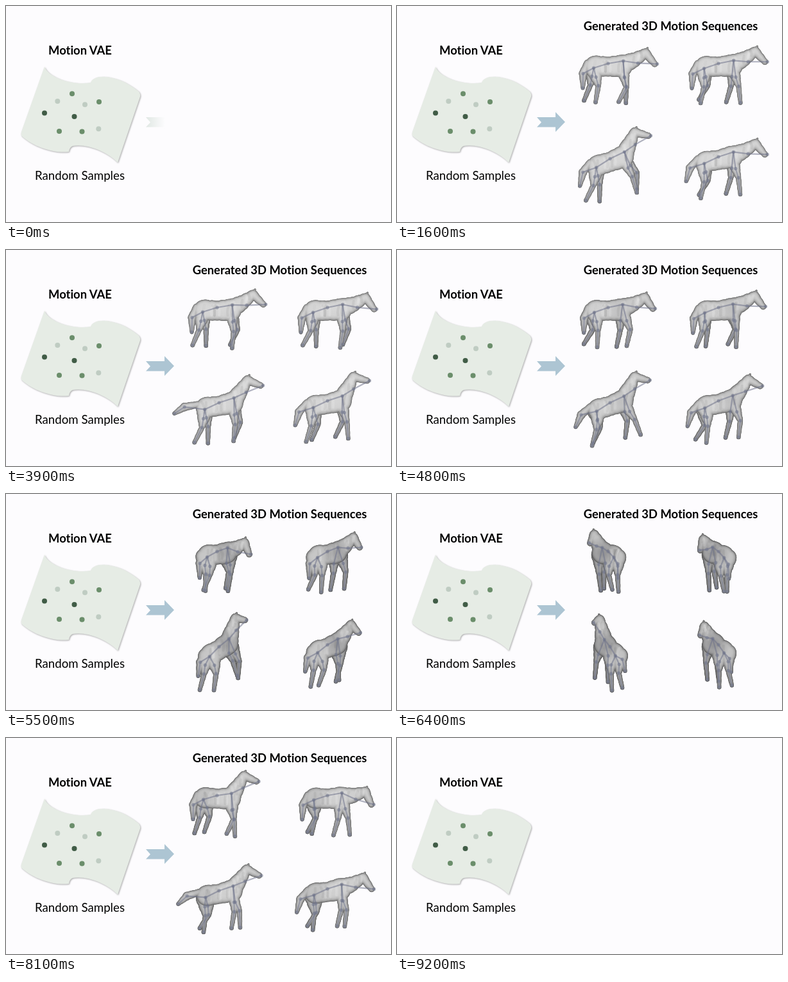
Animation of 600 by 338 pixels, one loop 9.9 s. Source, as an HTML page with a canvas:

```html
<!DOCTYPE html>
<html lang="en">
<head>
<meta charset="utf-8">
<title>Motion VAE</title>
<style>
html, body { margin: 0; width: 100%; height: 100%; overflow: hidden; background: #fdfcfe; }
svg, canvas { position: absolute; left: 0; top: 0; width: 600px; height: 338px; }
text { font: 18.7px Lato, sans-serif; font-variant-ligatures: none; text-anchor: middle; fill: #000; }
.bold { font-size: 18.4px; font-weight: 700; }
.sheet { fill: #e6ece5; filter: drop-shadow(1px 1.5px 1px #6668); }
</style>
</head>
<body>
<svg viewBox="0 0 600 338">
  <defs>
    <linearGradient id="wipe" gradientUnits="userSpaceOnUse" y1="0" y2="0">
      <stop offset="0" stop-color="#adc5d3"/>
      <stop offset="1" stop-color="#adc5d3" stop-opacity="0"/>
    </linearGradient>
  </defs>
  <text class="bold" x="115.5" y="76">Motion VAE</text>
  <path class="sheet" d="M60 95C66 112 104 125 132 120C136 105 176 107 207 134Q210 138 209 142L174 245C158 228 126 215 104 219Q99 221 98 228C78 231 44 222 24 203Q23 200 24 197Z"/>
  <g fill="#6b8e6b">
    <circle cx="103" cy="137.3" r="4"/><circle cx="145" cy="150" r="4"/>
    <circle cx="83" cy="196" r="4"/><circle cx="118.5" cy="196.5" r="4"/>
  </g>
  <g fill="#bfccc2">
    <circle cx="80.3" cy="149" r="4"/><circle cx="123" cy="154.3" r="4"/><circle cx="144.3" cy="192.3" r="4"/>
  </g>
  <g fill="#405c46">
    <circle cx="60" cy="167.6" r="4"/><circle cx="106.5" cy="173" r="4"/>
  </g>
  <text x="115" y="272">Random Samples</text>
  <path id="arrow" fill="url(#wipe)" d="M218 174H247V166L262 181.5L247 197V189.5H218L225 182Z"/>
  <text id="title" class="bold" x="426.5" y="38">Generated 3D Motion Sequences</text>
</svg>
<canvas id="herd" width="600" height="338"></canvas>
<script>
const $ = id => document.getElementById(id);
const ctx = $('herd').getContext('2d');
const { PI, sin, cos, max, min, round, abs, hypot } = Math;
const LOOP = 9900, STEP = 100, DEG = PI / 180;

// neck: degrees above level at each beat; prance: rearing and tail-raising
const beats = [1600, 2800, 3900, 5500, 7400];
const herd = [
  { x: 329, y: 94, period: 1467, zero: 3900, pitch: 0, droop: 80, prance: 0, neck: [28, 31, 34, 18, 57] },
  { x: 501, y: 94, period: 1000, zero: 1850, pitch: 2, droop: 77, prance: 0, neck: [31, 23, 25, 29, 15] },
  { x: 332, y: 243, period: 1150, zero: 1565, pitch: 14, droop: 42, prance: 1, neck: [64, 50, 56, 66, 54] },
  { x: 501, y: 240, period: 1100, zero: 775, pitch: 10, droop: 63, prance: 0, neck: [29, 49, 62, 40, 27] }
];

const clamp = (v, a = 0, b = 1) => min(b, max(a, v));
const mix = (a, b, u) => a + (b - a) * u;
const lerp = (p, q, u) => p.map((v, i) => mix(v, q[i], u));
const add = (p, x, y, z = 0) => [p[0] + x, p[1] + y, p[2] + z];
const reach = (p, length, angle) => add(p, length * cos(angle), length * sin(angle));

function track(values, t) {
  let k = 0;
  while (k < beats.length - 2 && t > beats[k + 1]) k++;
  const u = clamp((t - beats[k]) / (beats[k + 1] - beats[k]));
  return mix(values[k], values[k + 1], u * u * (3 - 2 * u));
}

// One full turn that gathers speed
const yawAt = t => 2 * PI * clamp((t - 3500) / 4700) ** 2.4;

// Skeleton in horse space: forward, up, side
function skeleton(h, t) {
  const wave = h.prance * cos(2 * PI * (t - 1600) / 3900);
  const pitch = (h.pitch + 5 * wave) * DEG;
  const neck = track(h.neck, t) * DEG;
  const chest = reach([0, 0, 0], 20.5, pitch), rump = reach([0, 0, 0], -20.5, pitch);
  const poll = reach(chest, 43, neck);
  const muzzle = reach(poll, 22, neck - 78 * DEG);
  const dock = add(rump, -12, 5);
  const tip = reach(dock, 40, PI + (h.droop + 25 * wave) * DEG);
  const legs = [0, 1, 2, 3].map(i => {
    const front = i > 1, side = i % 2 ? 1 : -1;
    const phase = 2 * PI * (t - h.zero) / h.period + (side > 0 ? PI : 0) + (front ? 0 : PI / 2);
    const bias = front ? .03 + .2 * (h.prance + wave) : -.08;
    const angle = bias + .2 * sin(phase) - PI / 2;
    const flex = .12 + .35 * max(0, cos(phase));
    const root = add(front ? chest : rump, front ? 2 : -2, -3, side * 7);
    const knee = reach(root, front ? 30 : 28, angle + flex * .6);
    return { front, root, knee, hoof: reach(knee, 26, angle - flex) };
  });
  return { chest, rump, poll, muzzle, dock, tip, legs };
}

// Chain of points with radii -> overlapping discs
function tube(pts, radii) {
  const discs = [];
  for (let i = 0; i < pts.length - 1; i++) {
    const p = pts[i], q = pts[i + 1];
    const n = max(1, Math.ceil(hypot(q[0] - p[0], q[1] - p[1]) / 1.5));
    for (let j = 0; j <= n; j++) {
      const wobble = 1 + .035 * sin(j * .9 + i * 2);
      const [x, y] = lerp(p, q, j / n);
      discs.push([x, y, mix(radii[i], radii[i + 1], j / n) * wobble]);
    }
  }
  return discs;
}

// Inset layers, from the dark rim to the light middle
function relief(discs, tone) {
  for (let k = 0; k < 12; k++) {
    const d = k * k * .1;
    const v = round(106 + tone + 108 * (1 - Math.exp(-d / 1.8)));
    ctx.fillStyle = `rgb(${v},${v},${v})`;
    ctx.beginPath();
    for (const [x, y, r] of discs) {
      if (r <= d) continue;
      ctx.moveTo(x + r - d, y - d * .2);
      ctx.arc(x, y - d * .2, r - d, 0, 7);
    }
    ctx.fill();
  }
}

function creases(discs) {
  ctx.lineWidth = 4;
  for (let i = 0; i < 14; i++) {
    const [x, y, r] = discs[i * 37 % discs.length];
    const w = r * .5, s = sin(i * 5.3);
    ctx.strokeStyle = i % 2 ? '#ffffff28' : '#60606018';
    ctx.beginPath();
    ctx.moveTo(x + s * w, y - w);
    ctx.quadraticCurveTo(x + s * w * .3, y, x + s * w * .6, y + w);
    ctx.stroke();
  }
}

// Darker patch over the end that faces away
function shade([x, y], alpha) {
  const glow = ctx.createRadialGradient(x, y, 4, x, y, 26);
  glow.addColorStop(0, `rgba(70,70,74,${alpha})`);
  glow.addColorStop(1, 'rgba(70,70,74,0)');
  ctx.globalCompositeOperation = 'source-atop';
  ctx.fillStyle = glow;
  ctx.fillRect(x - 26, y - 26, 52, 52);
  ctx.globalCompositeOperation = 'source-over';
}

function bones(pts, firstDot = 0) {
  ctx.beginPath();
  pts.forEach(([x, y]) => ctx.lineTo(x, y));
  ctx.stroke();
  for (const [x, y] of pts.slice(firstDot)) {
    ctx.beginPath();
    ctx.arc(x, y, 2.7, 0, 7);
    ctx.fill();
  }
}

function drawHorse(h, t) {
  const yaw = yawAt(t), c = cos(yaw), s = sin(yaw);
  const project = ([f, u, side]) => {
    const depth = side * c - f * s;
    return [h.x + f * c + side * s, h.y - u + depth * .1, depth];
  };
  const body = skeleton(h, t);
  const { chest, rump, poll, muzzle, dock, tip, legs } = body;
  const chain = (pts, radii) => tube(pts.map(project), radii);

  const tailMid = add(lerp(dock, tip, .5), -3, 3);
  const trunk = [
    ...chain([rump, add(lerp(rump, chest, .5), 0, -1), chest], [16, 15, 17]),
    ...chain([add(chest, 2, 2), add(lerp(chest, poll, .5), 0, -1), poll], [15, 11.5, 7.5])
  ];
  const head = [
    ...chain([poll, muzzle], [7.5, 4.8]),
    ...chain([add(poll, 1, 4), add(poll, 3, 8)], [3, 1.5])
  ];
  const tail = chain([dock, tailMid, tip], [5, 6.5, 3]);
  const limb = ({ front, root, knee, hoof }) =>
    chain([root, lerp(root, knee, .55), knee, hoof], front ? [11, 7, 4.2, 3.2] : [13, 8.5, 4.2, 3.2]);

  const sorted = [...legs].sort((a, b) => project(a.root)[2] - project(b.root)[2]);
  const tone = -20 * abs(s);
  relief(sorted.slice(0, 2).flatMap(limb), tone - 12);
  relief([...tail, ...sorted.slice(2).flatMap(limb), ...trunk, ...head], tone);
  creases(trunk);
  shade(project(s > 0 ? chest : rump), .4 * abs(s));

  ctx.strokeStyle = ctx.fillStyle = 'rgba(112,116,138,.55)';
  ctx.lineWidth = 2.2;
  const hip = add(rump, -2, -3), withers = add(chest, 3, 8);
  bones([tip, tailMid, hip, add(lerp(rump, chest, .5), 0, 4), withers,
    add(lerp(chest, muzzle, .5), 0, 3), add(muzzle, 4, 0)].map(project));
  for (const { front, root, knee, hoof } of legs)
    bones([front ? withers : hip, lerp(root, knee, .5), knee, hoof].map(project), 1);
}

function render(t) {
  const out = 1 - clamp((t - 8300) / 900);
  const shown = clamp((t - 400) / 600) * out;
  const edge = 248 + t / 400 * 64;
  $('wipe').setAttribute('x1', edge - 50);
  $('wipe').setAttribute('x2', edge);
  for (const stop of $('wipe').children)
    stop.setAttribute('stop-color', t < STEP ? '#cddad2' : '#adc5d3');
  $('arrow').style.opacity = out;
  $('title').style.opacity = $('herd').style.opacity = shown;
  ctx.clearRect(0, 0, 600, 338);
  if (shown > 0) herd.forEach(h => drawHorse(h, min(t, 8200)));
}

const start = performance.now();
let last = -1;
function tick() {
  const t = Math.floor((performance.now() - start) % LOOP / STEP) * STEP;
  if (t !== last) render(last = t);
  requestAnimationFrame(tick);
}
ctx.lineJoin = ctx.lineCap = 'round';
tick();
</script>
</body>
</html>
```
